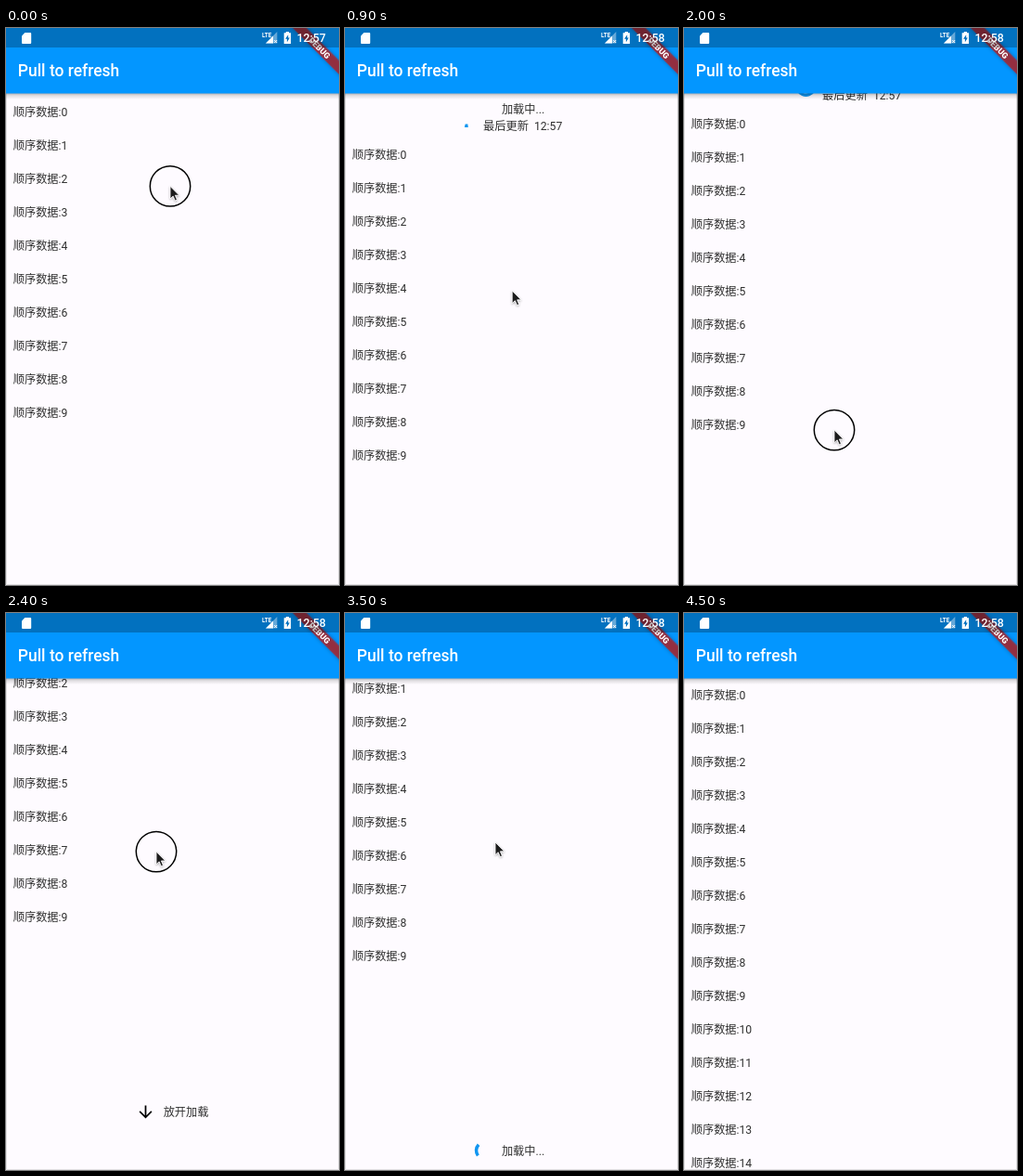
An HTML page for the animation above (4.6 s loop, 359 by 600 pixels).

```html
<!DOCTYPE html>
<html lang="zh-CN">
<head>
<meta charset="utf-8">
<title>Pull to refresh</title>
<style>
  html, body { margin: 0; width: 100%; height: 100%; overflow: hidden; background: #fefbff; }
  svg { display: block; }
  text { font: 12.2px Roboto, "Noto Sans CJK SC", "Noto Sans CJK", sans-serif; fill: #303030; }
  .mid { text-anchor: middle; }
  #title { font-size: 17.45px; font-weight: 500; fill: #fff; }
  #clock { font-size: 12.4px; font-weight: 500; fill: #fff; }
  #lte { font-size: 6.3px; font-weight: 700; fill: #fff; }
  #debug { font-size: 8.9px; font-weight: 900; fill: #fff; }
  .spin { fill: none; stroke: #1296f0; stroke-width: 3.5; }
</style>
</head>
<body>
<svg width="359" height="600" viewBox="0 0 359 600">
  <defs>
    <linearGradient id="shade" x2="0" y2="1">
      <stop stop-color="#000" stop-opacity=".32"/>
      <stop offset=".4" stop-color="#000" stop-opacity=".12"/>
      <stop offset="1" stop-color="#000" stop-opacity="0"/>
    </linearGradient>
    <filter id="soft" x="-50%" y="-50%" width="200%" height="200%">
      <feDropShadow dx="0" dy="1" stdDeviation="1" flood-opacity=".35"/>
    </filter>
    <filter id="glow" x="-20%" y="-100%" width="140%" height="300%">
      <feDropShadow dx="0" dy="0" stdDeviation="2" flood-opacity=".4"/>
    </filter>
    <path id="arrow" transform="scale(.873) translate(-12 -12)"
      d="M4 12l1.41 1.41L11 7.83V20h2V7.83l5.58 5.59L20 12l-8-8-8 8z"/>
  </defs>

  <rect width="359" height="600" fill="#fefbff"/>
  <g id="list">
    <g transform="translate(131.5 50)">
      <use id="upArrow" href="#arrow"/>
      <path id="topSpin" class="spin"/>
    </g>
    <text id="topText" class="mid" y="45.6"></text>
    <text id="updated" class="mid" y="64.1">最后更新&#160;&#160;12:57</text>
    <g id="footer">
      <g transform="translate(150.5 624)">
        <use id="downArrow" href="#arrow" transform="rotate(180)"/>
        <path id="endSpin" class="spin"/>
      </g>
      <text id="endText" class="mid" y="628.6"></text>
    </g>
  </g>
  <path d="M.5 70V599.5H358.5V70" fill="none" stroke="#e2e0e3"/>

  <rect y="70" width="359" height="7" fill="url(#shade)"/>
  <rect width="359" height="70.5" fill="#0396ff"/>
  <text id="title" x="12.8" y="52.3">Pull to refresh</text>
  <g transform="translate(359 .5) rotate(45)">
    <rect x="-45" y="24.4" width="90" height="10.5" fill="#b71c1c" fill-opacity=".76" filter="url(#glow)"/>
    <text id="debug" class="mid" y="32.8">DEBUG</text>
  </g>
  <rect width="359" height="21" fill="#000" fill-opacity=".25"/>

  <g fill="#fff">
    <path d="M20.3 5H26.2Q27.2 5 27.2 6V16Q27.2 17 26.2 17H18Q17 17 17 16V8.4Z"/>
    <path d="M292.3 4V16.5H280Z" opacity=".4"/>
    <path d="M288 8.5V16.5H280Z"/>
    <path d="M289.2 13l3 3m0-3l-3 3" stroke="#fff"/>
    <path d="M301.8 4h3.2v1.3h2.1V17h-7.4V5.3h2.1z"/>
  </g>
  <path d="M304.2 7.2l-3.1 4.6h1.8v3.4l3-4.7h-1.7z" fill="#0370bf"/>
  <text id="lte" x="276" y="10">LTE</text>
  <text id="clock" x="313.4" y="15.3"></text>

  <g id="pointer">
    <circle id="press" r="21.7" fill="none" stroke="#000" stroke-width="1.5"/>
    <path d="M0 0V14.6L3.4 11.5L5.7 16.8L8 15.8L5.8 10.6H10.5Z" transform="scale(.93)"
      fill="#1c1a1c" stroke="#fff" stroke-width=".9" filter="url(#soft)"/>
  </g>
</svg>
<script>
const LOOP = 4600, STEP = 100, ROW = 36;
const $ = id => document.getElementById(id);
const show = (id, on) => $(id).setAttribute('display', on ? 'inline' : 'none');
const place = (id, x, y) => $(id).setAttribute('transform', `translate(${x} ${y})`);

const rows = Array.from({ length: 20 }, (_, i) => {
  const row = document.createElementNS('http://www.w3.org/2000/svg', 'text');
  row.setAttribute('x', 7.8);
  row.setAttribute('y', 94.8 + i * ROW);
  row.textContent = '顺序数据:' + i;
  return $('list').appendChild(row);
});

// Eased 0..1 between two times, and exponential settling after a start time.
const ramp = (t, a, b) => {
  const u = Math.min(1, Math.max(0, (t - a) / (b - a)));
  return u * u * (3 - 2 * u);
};
const settle = (t, start, tau) => Math.exp(-Math.max(0, t - start) / tau);

function scrollAt(t) {
  if (t < 700) return 60.5 * ramp(t, 0, 500);
  if (t < 1900) return 42.5 + 18 * settle(t, 700, 130);
  if (t < 2550) return 42.5 * settle(t, 1850, 150) - 92.5 * ramp(t, 1950, 2473);
  if (t < 3700) return -45 - 47.5 * settle(t, 2550, 120);
  return -45 * settle(t, 3700, 236);
}

function pointerAt(t) {
  const pull = ramp(t, 0, 500), away = ramp(t, 1100, 1600), settleIn = ramp(t, 1600, 1850);
  return [
    177 + 3.2 * pull - 19.2 * away + settleIn,
    170.4 + 112.6 * pull + 97.5 * away + 57.5 * settleIn - 191 * ramp(t, 1950, 2473)
  ];
}

// cubic-bezier(.4, 0, .2, 1)
function fastOutSlowIn(x) {
  if (x <= 0) return 0;
  if (x >= 1) return 1;
  let lo = 0, hi = 1, s;
  for (let i = 0; i < 20; i++) {
    s = (lo + hi) / 2;
    const bx = 1.2 * (1 - s) ** 2 * s + .6 * (1 - s) * s * s + s ** 3;
    if (bx < x) lo = s; else hi = s;
  }
  return 3 * s * s - 2 * s ** 3;
}

function spinnerPath(t) {
  const cycle = 5.6 + (t - 1600) * 2.17e-3;
  const step = Math.floor(cycle), p = cycle - step;
  const head = fastOutSlowIn(p * 2), tail = fastOutSlowIn(p * 2 - 1);
  const start = -90 + 270 * tail + 360 * p - 144 * step;
  const sweep = Math.max(1, 270 * (head - tail));
  const point = deg => {
    const a = deg * Math.PI / 180;
    return `${9 * Math.cos(a)} ${9 * Math.sin(a)}`;
  };
  return `M${point(start)}A9 9 0 ${+(sweep > 180)} 1 ${point(start + sweep)}`;
}

function setIndicator(edge, arrow, loading, t) {
  const label = $(edge + 'Text');
  label.textContent = loading ? '加载中...' : '放开加载';
  label.setAttribute('x', loading ? 192 : 194);
  show(arrow, !loading);
  show(edge + 'Spin', loading);
  $(edge + 'Spin').setAttribute('d', spinnerPath(t));
}

function draw(t) {
  const refreshing = t >= 700, loaded = t >= 3700;
  place('list', 0, scrollAt(t));
  setIndicator('top', 'upArrow', refreshing, t);
  $('updated').setAttribute('x', refreshing ? 191.7 : 193.7);
  setIndicator('end', 'downArrow', t >= 2550, t);
  show('footer', !loaded);
  rows.forEach((row, i) => row.setAttribute('display', i < 10 || loaded ? 'inline' : 'none'));
  $('clock').textContent = t < 100 ? '12:57' : '12:58';
  place('pointer', ...pointerAt(t));
  show('pointer', t < 4300);
  show('press', t < 700 || (t >= 1900 && t < 2550));
}

const begin = performance.now();
function tick() {
  const t = (performance.now() - begin) % LOOP;
  draw(Math.floor(t / STEP) * STEP);
  requestAnimationFrame(tick);
}
tick();
</script>
</body>
</html>
```
